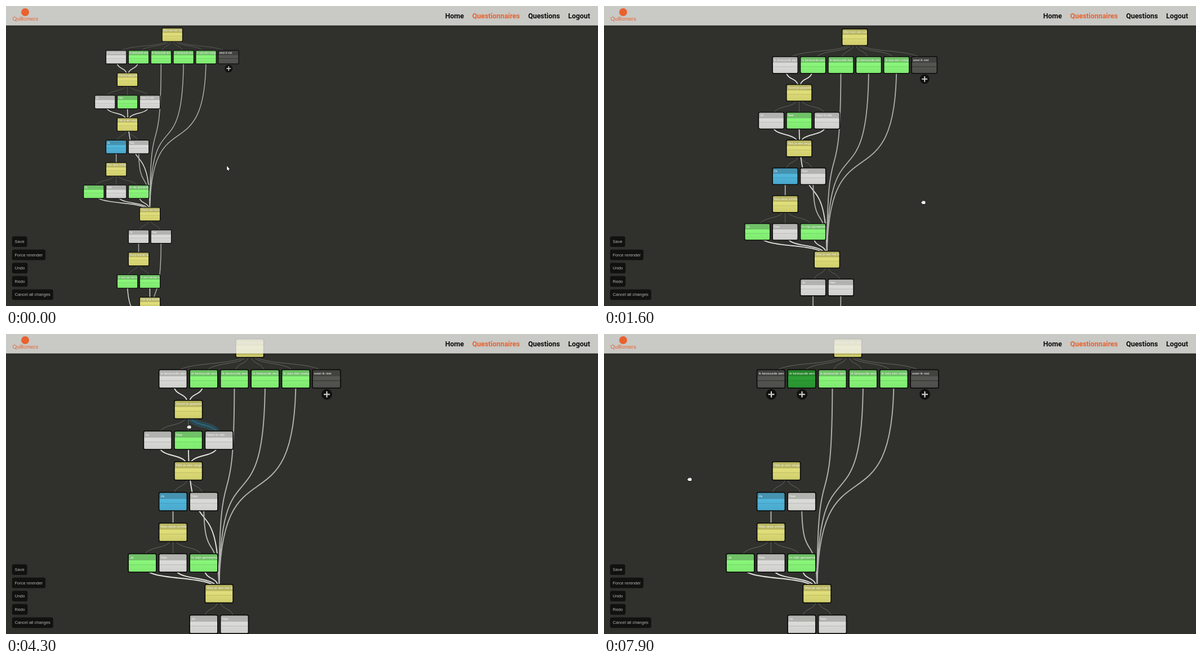
An HTML page with a canvas that plays this animation: 1051x533 px, repeating every 8000 ms.

```html
<!DOCTYPE html>
<html lang="nl">
<head>
<meta charset="utf-8">
<title>Questionnaires</title>
<style>
html, body { margin: 0; width: 100%; height: 100%; overflow: hidden; background: #30312d; }
canvas { display: block; }
</style>
</head>
<body>
<canvas id="stage" width="1051" height="533"></canvas>
<script>
const ctx = document.getElementById('stage').getContext('2d');
const W = 1051, H = 533, LOOP = 8000;
const SANS = '"Liberation Sans", Arial, sans-serif';
const ORANGE = '#e8622f';

// title band, body top, body bottom
const COLORS = {
  yellow: ['#b9b662', '#e2e07b', '#cfcd6c'],
  e: ['#b2b2af', '#dcdcda', '#cfcfcc'],
  g: ['#70c167', '#8af87a', '#7fe871'],
  b: ['#4593b1', '#52b8de', '#49a7cb'],
  k: ['#42433f', '#565753', '#4e4f4b'],
  d: ['#27862c', '#2da135', '#289130']
};

// Question column and title; each answer is colour, next question, title
const QUESTIONS = [
  [1, 'Wat voor een soort', 'e1ik bestuurde een', 'g1ik bestuurde een', 'g4ik bestuurde een',
    'g4ik bestuurde een', 'g4ik was een voetganger', 'k-weet ik niet'],
  [-1, 'Stond je geparkeerd', 'e2Ja', 'g4Nee', 'e2Weet ik niet'],
  [-1, 'Heb je een vergunning', 'b3Ja', 'e4Nee'],
  [-1.5, 'Was deze zichtbaar', 'g4Ja', 'e4Nee', 'g4In mijn gemeente'],
  [0, 'Was je aan het laden', 'e5Ja', 'e7Nee'],
  [-.5, 'Zou je kunnen aantonen', 'g7ik was aan het laden', 'g6ik was mensen aan'],
  [0, 'Hoe lang duurde het'],
  [0, '']
].map(([col, title, ...answers], q) => ({
  col, title, row: 2 * q,
  answers: answers.map((s, i) => ({
    kind: s[0], next: +s[1], title: s.slice(2),
    row: 2 * q + 1, col: col + i - (answers.length - 1) / 2
  }))
}));

const CHOSEN = 1, SELECT_AT = 5900, DELETE_AT = 7800;

// Pointer moves after the zoom: start, end, x, y
const MOVES = [
  [2200, 2700, 341, 208], [2700, 3600, 326, 192], [4100, 4300, 325, 165], [5000, 5100, 322, 139],
  [5800, 6000, 341, 145], [6100, 6300, 137, 221], [7600, 7900, 152, 258]
];

let ox, oy, u;

const span = (t, a, b) => Math.min(1, Math.max(0, (t - a) / (b - a)));
const mix = (a, b, p) => a + (b - a) * p;
const px = n => ox + n.col * u;
const py = n => oy + n.row * u;

// The point that is grabbed, dragged and then zoomed about
function anchor(t) {
  const p = span(t, 500, 800);
  return [mix(392.7, 565, p) + span(t, 900, 1000), mix(286.9, 347.8, p)];
}

function setView(t) {
  const [ax, ay] = anchor(t);
  u = 39.85 + 9.55 * span(t, 1100, 1600) + 5.1 * span(t, 1800, 2000);
  ox = ax - 3.445 * u;
  oy = ay - 5.918 * u;
}

function box(x, y, w, h, r, fill) {
  ctx.beginPath();
  ctx.roundRect(x, y, w, h, r);
  if (fill) { ctx.fillStyle = fill; ctx.fill(); }
}

function disc(x, y, r, fill) {
  ctx.fillStyle = fill;
  ctx.beginPath();
  ctx.arc(x, y, r, 0, 7);
  ctx.fill();
}

function text(s, x, y, font, color) {
  ctx.font = font;
  ctx.fillStyle = color;
  ctx.fillText(s, x, y);
}

function link(a, b, color, width) {
  const x0 = px(a), y0 = py(a), x1 = px(b), y1 = py(b);
  ctx.beginPath();
  ctx.moveTo(x0, y0);
  ctx.bezierCurveTo(x0, mix(y0, y1, .75), x1, mix(y0, y1, .25), x1, y1);
  ctx.strokeStyle = color;
  ctx.lineWidth = width * u;
  ctx.stroke();
}

function plus(n) {
  const x = px(n) + .01 * u, y = py(n) + .505 * u, a = .1 * u, b = .02 * u;
  disc(x, y, .173 * u, '#10110e');
  ctx.fillStyle = '#d0d0cd';
  ctx.fillRect(x - a, y - b, 2 * a, 2 * b);
  ctx.fillRect(x - b, y - a, 2 * b, 2 * a);
}

function node(n, kind, selected) {
  const [band, top, bottom] = COLORS[kind];
  const w = .915 * u, h = .6 * u, x = px(n) - w / 2, y = py(n) - h / 2;
  if (y > H) return;
  ctx.save();
  box(x, y, w, h, .05 * u);
  ctx.clip();
  const g = ctx.createLinearGradient(0, y + .36 * h, 0, y + h);
  g.addColorStop(0, top);
  g.addColorStop(1, bottom);
  ctx.fillStyle = g;
  ctx.fillRect(x, y, w, h);
  ctx.fillStyle = band;
  ctx.fillRect(x, y, w, .36 * h);
  ctx.fillStyle = kind === 'k' ? 'rgba(0,0,0,.35)' : 'rgba(0,0,0,.1)';
  ctx.fillRect(x, y + .58 * h, w, .025 * u);
  text(n.title, x + .055 * u, y + .155 * u, `${.112 * u}px ${SANS}`, '#f4f4f2');
  ctx.restore();
  box(x, y, w, h, .05 * u);
  ctx.strokeStyle = selected ? '#4fb9e0' : '#0c0d0b';
  ctx.lineWidth = .032 * u;
  ctx.stroke();
}

function tree(t) {
  const cut = t >= DELETE_AT;
  const shown = QUESTIONS.filter((_, q) => !cut || q !== CHOSEN);
  const isOpen = a => a.kind === 'k' || cut && a.next === CHOSEN;
  const hovered = t >= 4200 && t < 5100 && QUESTIONS[CHOSEN].answers[2];

  for (const q of shown)
    for (const a of q.answers) {
      if (a === hovered) link(q, a, 'rgba(38,112,140,.38)', .2);
      link(q, a, a === hovered ? '#2b8db0' : '#6b6c68', .017);
    }
  for (const q of shown)
    for (const a of q.answers) {
      if (isOpen(a)) { plus(a); continue; }
      const bright = QUESTIONS.indexOf(q) % 2 || a.next === CHOSEN;
      link(a, QUESTIONS[a.next], bright ? '#e4e4e1' : '#b3b3b0', .035);
    }
  for (const q of shown) {
    const selected = t >= SELECT_AT && q === QUESTIONS[CHOSEN];
    node(q, 'yellow', selected);
    for (const a of q.answers)
      node(a, !isOpen(a) ? a.kind : a.kind === 'g' ? 'd' : 'k', selected);
  }
}

function header() {
  const g = ctx.createLinearGradient(0, 34, 0, 38);
  g.addColorStop(0, 'rgba(0,0,0,.3)');
  g.addColorStop(1, 'rgba(0,0,0,0)');
  ctx.fillStyle = g;
  ctx.fillRect(0, 34.6, W, 3.4);
  ctx.fillStyle = 'rgba(239,239,235,.8)';
  ctx.fillRect(0, 0, W, 34.6);

  disc(34, 11, 7, ORANGE);
  text('Quillomera', 11.5, 26.3, '9.4px Lato, sans-serif', ORANGE);

  // Menu items are laid out from the right edge
  let x = 1037;
  for (const s of ['Logout', 'Questions', 'Questionnaires', 'Home']) {
    ctx.font = 'bold 12.4px Roboto, sans-serif';
    x -= ctx.measureText(s).width;
    text(s, x, 21.5, ctx.font, s === 'Questionnaires' ? ORANGE : '#0b0b0b');
    x -= 14.8;
  }
}

function buttons() {
  const font = `7.5px ${SANS}`;
  ['Save', 'Force rerender', 'Undo', 'Redo', 'Cancel all changes'].forEach((s, i) => {
    const y = 409.2 + i * 23.55;
    ctx.font = font;
    box(10.8, y, ctx.measureText(s).width + 9.6, 18.8, 3, '#11120f');
    text(s, 15.5, y + 12, font, '#b4b4b1');
  });
}

function outlined() {
  ctx.lineJoin = 'round';
  ctx.strokeStyle = '#0a0a0a';
  ctx.lineWidth = 1.4;
  ctx.stroke();
  ctx.fillStyle = '#fff';
  ctx.fill();
}

function arrow() {
  ctx.beginPath();
  ctx.moveTo(-1.5, -4);
  ctx.lineTo(-1.5, 4);
  ctx.lineTo(.2, 2.6);
  ctx.lineTo(1.3, 5);
  ctx.lineTo(2.5, 4.4);
  ctx.lineTo(1.4, 2.2);
  ctx.lineTo(3.6, 2);
  ctx.closePath();
  outlined();
}

function hand() {
  ctx.beginPath();
  ctx.roundRect(-2.6, -2.6, 6.2, 5.6, 1.6);
  ctx.roundRect(-3.9, -.4, 4, 2.2, 1);
  outlined();
  ctx.fillStyle = 'rgba(0,0,0,.5)';
  for (let i = 0; i < 3; i++) ctx.fillRect(-.9 + 1.5 * i, -2, .5, 1.6);
}

function pointer(t) {
  let [x, y] = anchor(t).map(v => v + 1);
  for (const [a, b, tx, ty] of MOVES) {
    const p = span(t, a, b);
    x = mix(x, tx, p);
    y = mix(y, ty, p);
  }
  ctx.save();
  ctx.translate(x, y);
  t < 400 ? arrow() : hand();
  ctx.restore();
}

function draw(now) {
  const t = Math.floor((now % LOOP) / 100) * 100;
  setView(t);
  ctx.fillStyle = '#30312d';
  ctx.fillRect(0, 0, W, H);
  tree(t);
  header();
  buttons();
  pointer(t);
}

const start = performance.now();
function tick() {
  draw(performance.now() - start);
  requestAnimationFrame(tick);
}
tick();
</script>
</body>
</html>
```
